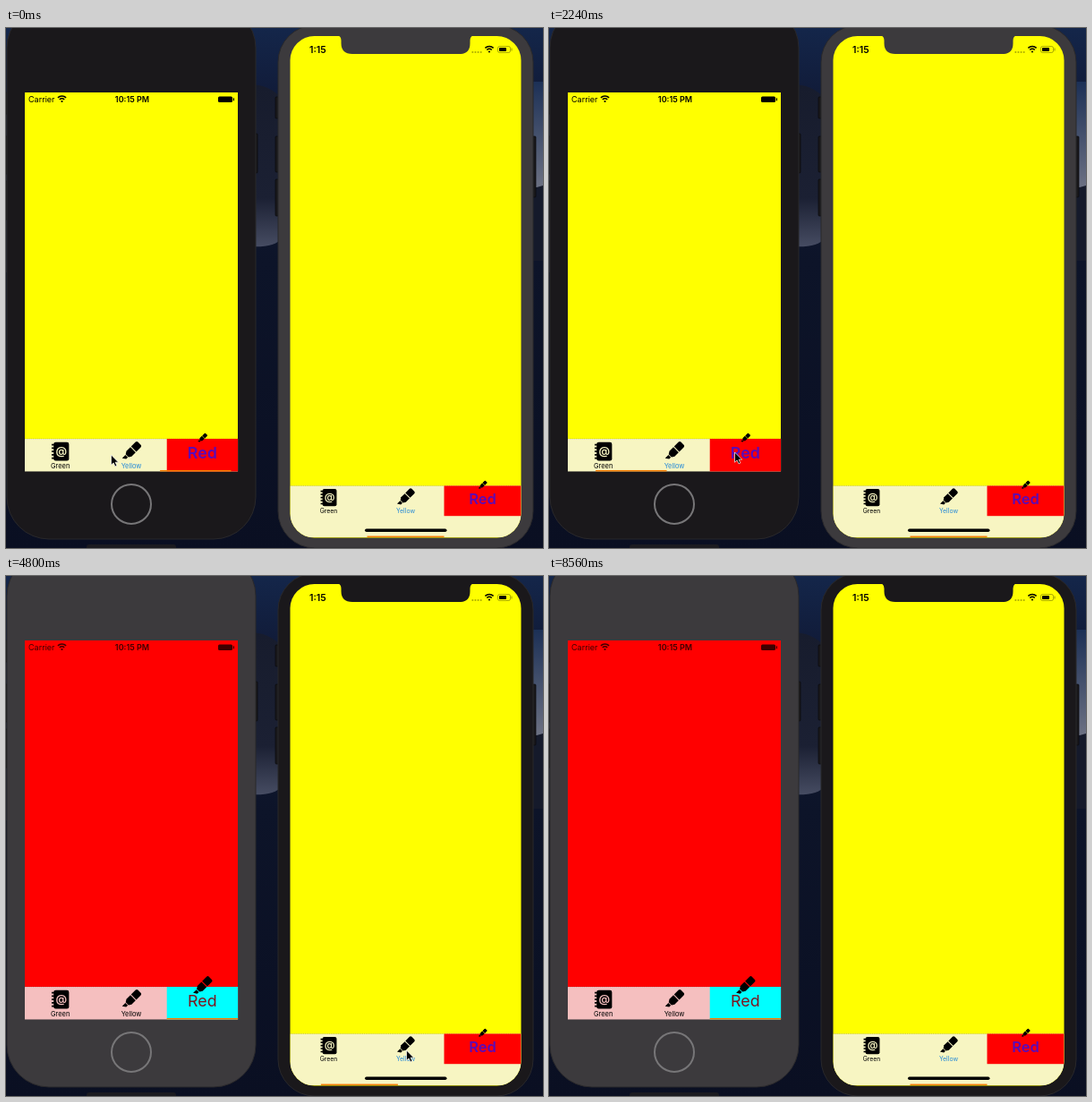
An HTML page for the animation above (8.6 s loop, 600 by 581 pixels).

```html
<!DOCTYPE html>
<html lang="en">
<head>
<meta charset="utf-8">
<title>Tab bars</title>
<style>
  html, body { margin: 0; width: 100%; height: 100%; overflow: hidden; background: #0d1429; }
  svg { display: block; width: 600px; height: 581px; font-family: Inter, Roboto, sans-serif; }
</style>
</head>
<body>
<svg id="stage" viewBox="0 0 600 581">
  <defs>
    <linearGradient id="sky" x1="0" y1="0" x2="0" y2="1">
      <stop offset="0" stop-color="#14264a"/>
      <stop offset=".12" stop-color="#111c3a"/>
      <stop offset=".45" stop-color="#0d1429"/>
      <stop offset="1" stop-color="#0a0f22"/>
    </linearGradient>
    <linearGradient id="dune" x1="0" y1="0" x2="0" y2="1">
      <stop offset="0" stop-color="#171c2d"/>
      <stop offset=".7" stop-color="#1b2033"/>
      <stop offset="1" stop-color="#464c62"/>
    </linearGradient>
    <linearGradient id="haze" x1="0" y1="0" x2="0" y2="1">
      <stop offset="0" stop-color="#1c3056"/>
      <stop offset="1" stop-color="#6c7183"/>
    </linearGradient>
    <g id="book">
      <rect x="-10" y="-14" width="23" height="28" rx="3"/>
      <path d="M-13-10h5M-13-5h5M-13 0h5M-13 5h5M-13 10h5" stroke="#000" stroke-width="2.4"/>
    </g>
    <g id="pen" transform="rotate(45)">
      <path d="M-3-17H3Q5.5-17 5.5-14.5V-5H-5.5V-14.5Q-5.5-17-3-17Z"/>
      <path d="M-5.5-3.6H5.5V5L3 9H-3L-5.5 5Z"/>
      <path d="M-2.6 10H2.6V13.5L-2.6 17Z"/>
    </g>
    <g id="wifi" fill="none" stroke="#000" stroke-width="1.5">
      <path d="M-4.6-1.6a6.5 6.5 0 0 1 9.2 0M-2.7.5a3.8 3.8 0 0 1 5.4 0"/>
      <circle cy="2.5" r="1.1" fill="#000" stroke="none"/>
    </g>
  </defs>

  <rect width="600" height="581" fill="url(#sky)"/>
  <path d="M270 63Q292 62 308 78V235Q300 246 270 244Z" fill="url(#dune)"/>
  <rect x="586" y="60" width="14" height="118" fill="url(#haze)"/>
  <path d="M586 180L600 176V260H586Z" fill="#151a2b"/>
  <path d="M0 72H3V273H0Z" fill="#222636"/>
  <rect x="90" y="577" width="100" height="8" rx="3" fill="#1b1b20"/>

  <g fill="#19181b" stroke="#0a0a0c" stroke-width=".7">
    <rect x="-1" y="72" width="4" height="24"/>
    <rect x="-1" y="121" width="4" height="42"/>
    <rect x="-1" y="171" width="4" height="43"/>
    <rect x="277" y="118" width="4" height="44" rx="1"/>
    <rect x="301" y="77" width="5" height="24" rx="1"/>
    <rect x="301" y="121" width="5" height="40" rx="1"/>
    <rect x="301" y="169" width="5" height="41" rx="1"/>
    <rect x="587" y="121" width="5" height="68" rx="1"/>
  </g>

  <g id="phoneA">
    <rect class="body" x="1" y="-25" width="278" height="596" rx="47" stroke="#29282b"/>
    <circle cx="140" cy="532" r="22" fill="none" stroke="#777678" stroke-width="2"/>
    <rect class="screen" x="21" y="72" width="238" height="423"/>
    <g class="status">
      <text x="25" y="83" font-size="9">Carrier</text>
      <use href="#wifi" x="62.5" y="79.5"/>
      <text x="141" y="83" font-size="9" font-weight="600" text-anchor="middle">10:15 PM</text>
      <rect x="237" y="76.5" width="16" height="6.5" rx="1.5"/>
      <rect x="253.8" y="78.3" width="1.2" height="3"/>
    </g>
    <g class="bar" transform="translate(21 459) scale(.744)"></g>
  </g>

  <g id="phoneB">
    <rect class="body" x="304" y="-3" width="285" height="584" rx="41" stroke="#29282b"/>
    <clipPath id="glass"><rect x="317.5" y="9" width="258" height="560.5" rx="27"/></clipPath>
    <g clip-path="url(#glass)">
      <rect class="screen" x="317" y="9" width="259" height="561"/>
      <g class="bar" transform="translate(317.5 511.5) scale(.688)"></g>
    </g>
    <path class="notch" d="M370 8Q374.500 9 374.500 14V17Q374.500 29 387 29H507Q518.500 29 518.500 17V14Q518.500 9 523 8Z"/>
    <g class="status">
      <text x="339" y="28" font-size="10.500" font-weight="600">1:15</text>
      <path d="M520.500 27h11" stroke="#000" stroke-opacity=".4" stroke-width="1.500" stroke-dasharray="1.700 1.400"/>
      <use href="#wifi" x="540" y="24"/>
      <rect x="549.500" y="20.500" width="14" height="7" rx="2" fill="none" stroke="#000" stroke-opacity=".4" stroke-width=".8"/>
      <rect x="551" y="22" width="8" height="4" rx=".8"/>
      <rect x="564.500" y="22.500" width="1" height="3" fill-opacity=".4"/>
    </g>
    <rect x="401" y="559.500" width="91.500" height="3.600" rx="1.800"/>
  </g>

  <path id="cursor" d="M0 0V11.200L2.600 8.900L4.500 12.900L6.400 12L4.600 8.200H8.100Z" stroke="#fff" stroke-width=".7"/>
</svg>

<script>
const LOOP = 8600, SLIDE = 1500, FOCUS_AT = 3180;
const GREEN = 0, YELLOW = 1, RED = 2;
const SCREENS = ['#00ff00', '#ffff00', '#ff0000'];
const BARS = ['#c4f5c4', '#f7f5c2', '#f5bfbf'];

// [time, tab]
const TAPS_A = [[-300, YELLOW], [825, GREEN], [1840, YELLOW], [2510, RED]];
const TAPS_B = [[3180, GREEN], [3660, YELLOW], [4010, GREEN], [4760, YELLOW], [5575, RED], [6250, YELLOW]];

// [time, x, y]
const POINTER = [
  [0, 117.5, 477], [780, 82.5, 484], [900, 82.5, 484], [1750, 139, 478], [1870, 139, 478],
  [2240, 207.5, 474], [2540, 208, 475], [3120, 365, 533], [3220, 365, 533], [3620, 437.5, 532.5],
  [3740, 437.5, 532.5], [3980, 372, 532], [4060, 372, 532], [4700, 447.5, 530], [4850, 447.5, 530],
  [5500, 528, 530], [5620, 528, 530], [6150, 463, 535], [6350, 463, 535], [7000, 458, 592]
];

const ease = p => (1 - Math.cos(Math.PI * Math.min(1, Math.max(0, p)))) / 2;
const mix = (a, b, p) => a + (b - a) * p;

function selected(taps, first, t) {
  return taps.reduce((tab, [at, next]) => at <= t ? next : tab, first);
}

// Each tap restarts the slide from wherever the line is.
function linePos(taps, first, t) {
  let from = first, to = first, start = -SLIDE;
  for (const [at, tab] of taps) {
    if (at > t) break;
    from = mix(from, to, ease((at - start) / SLIDE));
    to = tab;
    start = at;
  }
  return mix(from, to, ease((t - start) / SLIDE));
}

function pointerAt(t) {
  const i = POINTER.findIndex(p => p[0] > t);
  if (i < 0) return POINTER[POINTER.length - 1].slice(1);
  const [a, b] = [POINTER[i - 1], POINTER[i]];
  const p = ease((t - a[0]) / (b[0] - a[0]));
  return [mix(a[1], b[1], p), mix(a[2], b[2], p)];
}

// Bar contents are in points, placed by the group's scale.
function makePhone(id, width, height, taps, first) {
  const root = document.getElementById(id);
  const q = s => root.querySelector(s);
  const w = width / 3;
  const mid = n => w * (n + .5);
  q('.bar').innerHTML = `
    <rect class="back" width="${width}" height="${height}"/>
    <path d="M0 0H${width}" stroke="#000" stroke-opacity=".4" stroke-width=".7" stroke-dasharray="1.5 1.5"/>
    <use href="#book" x="${mid(0)}" y="19"/>
    <text class="at" x="${mid(0) + 1.7}" y="24.500" font-size="17" font-weight="600" text-anchor="middle">@</text>
    <use href="#pen" x="${mid(1)}" y="19"/>
    <g font-size="10" text-anchor="middle">
      <text class="title" x="${mid(0)}" y="44">Green</text>
      <text class="title" x="${mid(1)}" y="44">Yellow</text>
    </g>
    <g class="badge">
      <circle cx="${mid(0) + 10}" cy="12" r="9.300" fill="#f00"/>
      <text x="${mid(0) + 10}" y="16.300" font-size="12" fill="#fff" text-anchor="middle">3</text>
    </g>
    <rect class="cell" x="${2 * w}" width="${w}" height="49"/>
    <text class="red" x="${mid(2)}" y="30" font-size="24" text-anchor="middle">Red</text>
    <use class="redPen" href="#pen"/>
    <rect class="line" y="${height - 2}" width="${w}" height="2" fill="#f57c00"/>`;
  const parts = {};
  for (const name of ['body', 'screen', 'status', 'notch', 'back', 'at', 'badge', 'cell', 'red', 'redPen', 'line'])
    parts[name] = q('.' + name);
  const titles = root.querySelectorAll('.title');
  const set = (name, key, value) => parts[name] && parts[name].setAttribute(key, value);

  return (t, active) => {
    const tab = selected(taps, first, t), isRed = tab === RED;
    const shell = active ? '#1a181b' : '#3c3a3d';
    set('body', 'fill', shell);
    set('notch', 'fill', shell);
    set('screen', 'fill', SCREENS[tab]);
    set('status', 'opacity', isRed ? .75 : 1);
    set('back', 'fill', BARS[tab]);
    set('at', 'fill', BARS[tab]);
    set('badge', 'visibility', tab === GREEN ? 'visible' : 'hidden');
    set('cell', 'fill', isRed ? '#00ffff' : '#ff0000');
    set('red', 'fill', isRed ? '#7d1620' : '#5a0bb8');
    set('red', 'font-weight', isRed ? 400 : 600);
    set('redPen', 'transform', `translate(${mid(2)} -1) scale(${isRed ? 1 : .5})`);
    set('line', 'x', linePos(taps, first, t) * w);
    titles.forEach((el, n) => el.setAttribute('fill', n === tab ? '#2389d8' : '#000'));
  };
}

const drawA = makePhone('phoneA', 320, 49, TAPS_A, RED);
const drawB = makePhone('phoneB', 375, 83.5, TAPS_B, YELLOW);
const cursor = document.getElementById('cursor');
const began = performance.now();

function frame() {
  const t = (performance.now() - began) % LOOP;
  drawA(t, t < FOCUS_AT);
  drawB(t, t >= FOCUS_AT);
  cursor.setAttribute('transform', `translate(${pointerAt(t).join(' ')})`);
  requestAnimationFrame(frame);
}
frame();
</script>
</body>
</html>
```
